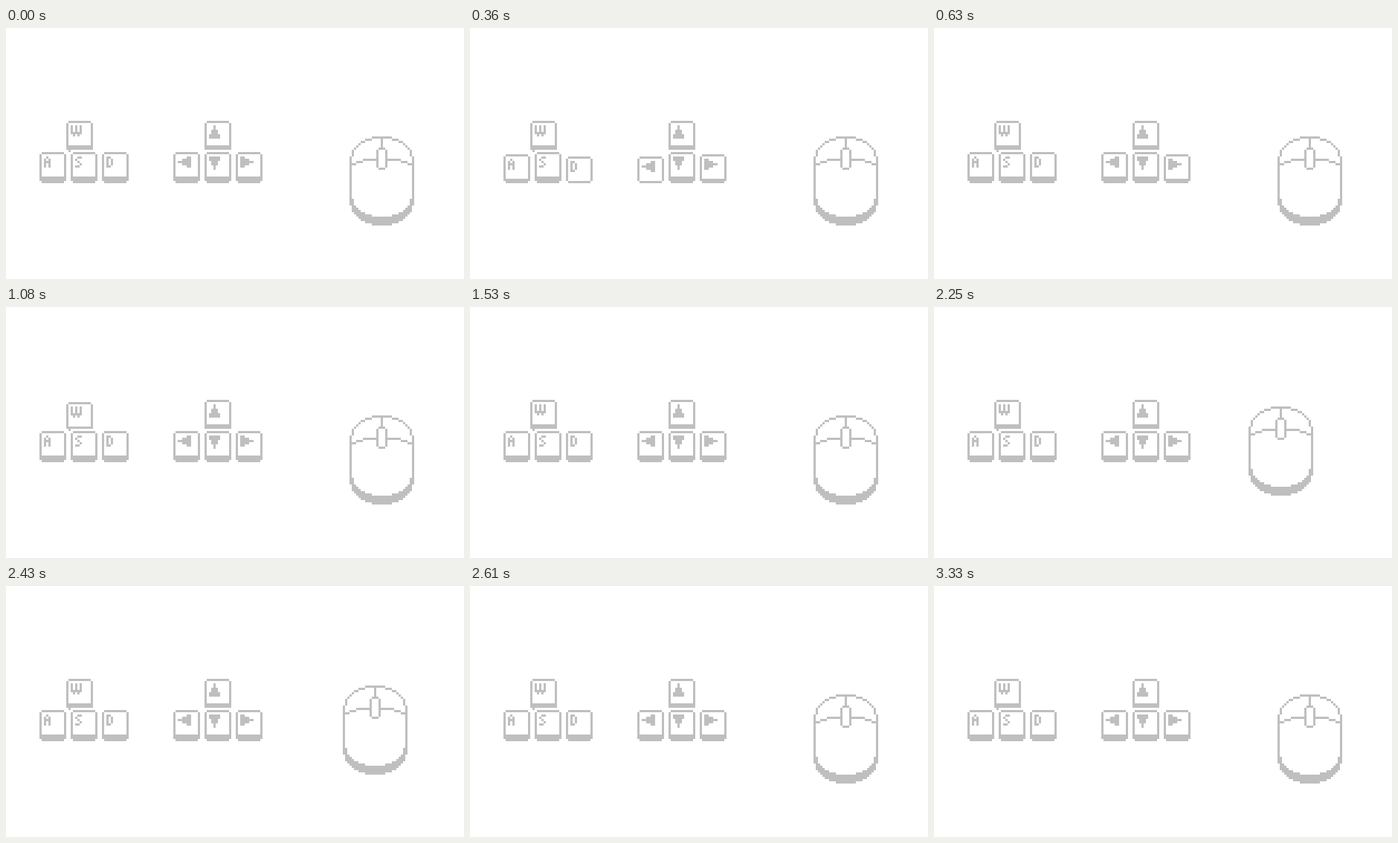
An HTML page with a canvas that plays this animation: 616x338 px, repeating every 3.69 s.

```html
<!DOCTYPE html>
<html lang="en">
<head>
<meta charset="utf-8">
<title>Controls</title>
<style>
html, body { margin: 0; width: 100%; height: 100%; overflow: hidden; background: #fff; }
canvas { display: block; }
</style>
</head>
<body>
<canvas id="stage" width="616" height="338"></canvas>
<script>
const ctx = document.getElementById('stage').getContext('2d');
const CELL = 3, TICK = 90, LOOP = 41;
const GRAY = '#bfbfbf', WHITE = '#fff';

// Rectangle in cells, offset from a pixel origin
function box(x, y, c, r, w, h, color = GRAY) {
  ctx.fillStyle = color;
  ctx.fillRect(x + c * CELL, y + r * CELL, w * CELL, h * CELL);
}

const UP = ['..#..', '..#..', '.###.', '.###.', '#####', '#####'];
const RIGHT = ['##....', '####..', '######', '####..', '##....'];
const flip = rows => rows.map(s => [...s].reverse().join(''));

// x, y, glyph, tick at which the press begins
const keys = [
  [81, 125, ['#.#.#', '#.#.#', '#.#.#', '#####', '.#.#.'], 12],
  [267, 125, UP, 13],
  [45, 167, ['.#.', '#.#', '###', '#.#', '#.#'], 1],
  [87, 167, ['.##', '#..', '.#.', '..#', '##.']],
  [129, 167, ['##.', '#.#', '#.#', '#.#', '##.'], 2],
  [225, 167, flip(RIGHT), 3],
  [267, 167, [...UP].reverse()],
  [309, 167, RIGHT, 4]
];
const PRESS = [1, 2, 2, 1];
const CLICK = [1, 2, 1, 2, 1];

function drawKey([x, y, glyph, start], tick) {
  const d = PRESS[tick - start] || 0;
  box(x, y, 0, -1, 12, 1, WHITE);
  box(x, y, 1, d, 10, 14 - d);
  box(x, y, 0, d + 1, 12, 12 - d);
  box(x, y, 1, d + 1, 10, 10, WHITE);
  glyph.forEach((row, r) => [...row].forEach((ch, c) => {
    if (ch === '#') box(x, y, c + 2, r + d + 2, 1, 1);
  }));
}

// Is the cell inside a capsule 29 cells wide with the given height?
function inside(c, r, height, d) {
  if (c < 14) r = Math.min(r, 15) - d + Math.max(r - 15, 0) + (r > 15 ? d : 0);
  if (r < 0 || r >= height) return false;
  const cap = 11.5;
  const v = Math.max(cap - r - 0.5, r + 0.5 - height + cap, 0) / cap;
  return Math.abs(c - 14) <= 14.5 * Math.sqrt(1 - v * v);
}

function drawMouse(x, y, d) {
  for (let r = 0; r < 40; r++) {
    for (let c = 0; c < 29; c++) {
      const inner = inside(c - 1, r, 37, d) && inside(c + 1, r, 37, d) &&
        inside(c, r - 1, 37, d) && inside(c, r + 1, 37, d);
      if (inside(c, r, 40, d) && !inner) box(x, y, c, r, 1, 1);
    }
  }
  // Lower edge of the buttons
  for (let c = 1; c < 28; c++) {
    const v = (c - 14) / 14.5;
    box(x, y, c, Math.floor(10 + 5 * (1 - Math.sqrt(1 - v * v))), 1, 1);
  }
  // Divider and wheel
  box(x, y, 14, 0, 1, 5);
  box(x, y, 13, 5, 3, 10);
  box(x, y, 12, 6, 5, 8);
  box(x, y, 13, 6, 3, 8, WHITE);
}

function mouseOffset(tick) {
  const k = tick - 20;
  if (k < 1 || k > 8) return [0, 0];
  const a = (25 + 40 * k) * Math.PI / 180;
  return [Math.round(-7.5 + 7.5 * Math.cos(a)), Math.round(-1.5 + 3.5 * Math.sin(a))];
}

function draw(now) {
  const tick = Math.floor(now / TICK) % LOOP;
  ctx.fillStyle = WHITE;
  ctx.fillRect(0, 0, 616, 338);
  keys.forEach(key => drawKey(key, tick));
  const [dx, dy] = mouseOffset(tick);
  drawMouse(462 + dx * CELL, 146 + dy * CELL, CLICK[tick - 32] || 0);
}

const t0 = performance.now();
function loop() {
  draw(performance.now() - t0);
  requestAnimationFrame(loop);
}
loop();
</script>
</body>
</html>
```
